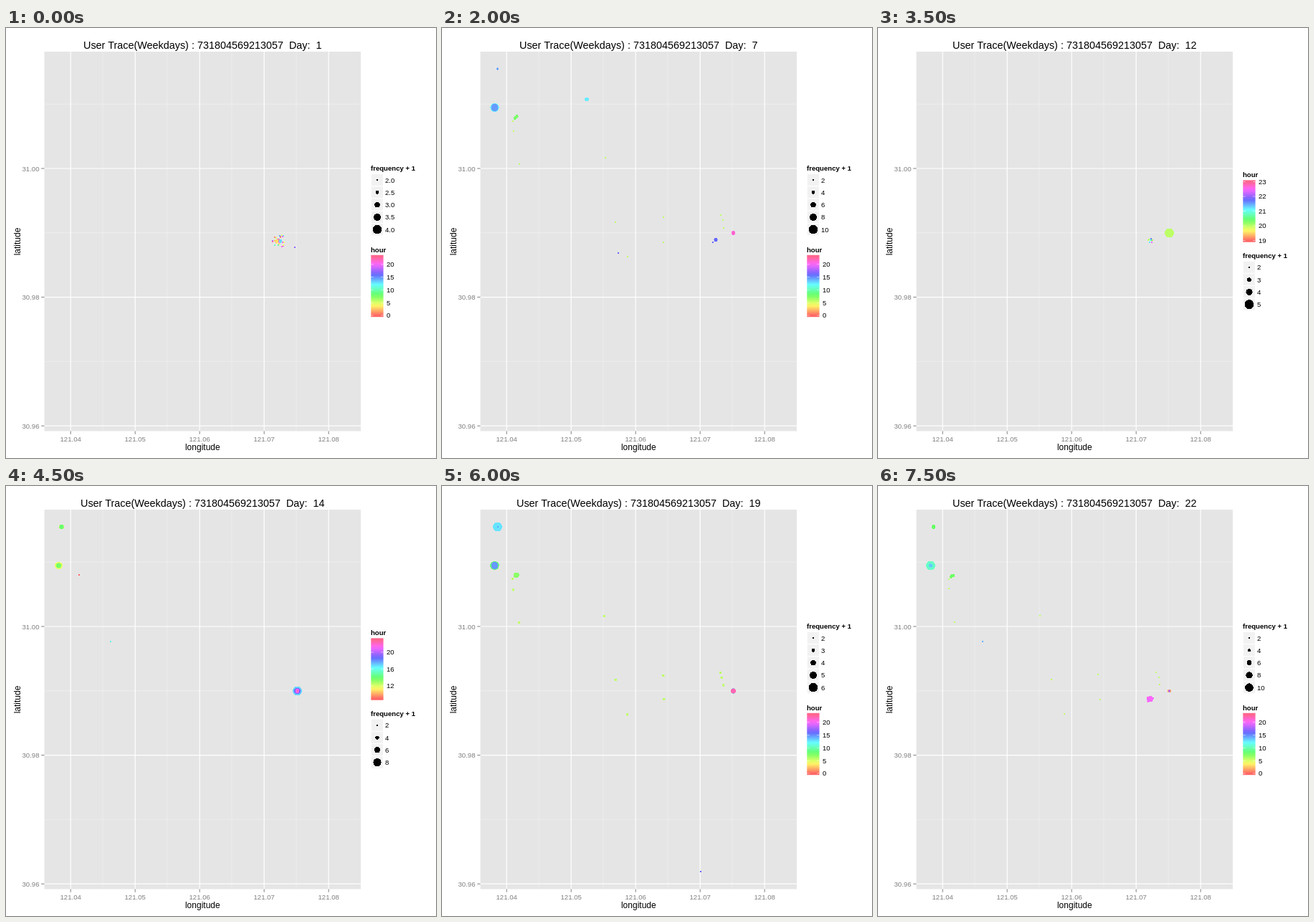
An HTML page for the animation above (8 s loop, 600 px wide and 600 px high).

```html
<!DOCTYPE html>
<html lang="en">
<head>
<meta charset="utf-8">
<title>User trace</title>
<style>
html, body { margin: 0; width: 100%; height: 100%; overflow: hidden; background: #fff; }
svg { display: block; width: 600px; height: 600px; font: 9.6px "Liberation Sans", Arial, sans-serif; }
text { white-space: pre; }
.mid { text-anchor: middle; }
.end { text-anchor: end; }
.grey { fill: #7f7f7f; }
.bold { font-weight: bold; }
.title { font-size: 14.4px; }
.axis { font-size: 12px; }
circle { shape-rendering: crispEdges; }
</style>
</head>
<body>
<svg viewBox="0 0 600 600">
  <defs><linearGradient id="hours" x1="0" y1="1" x2="0" y2="0"></linearGradient></defs>
  <g id="axes"></g>
  <g id="plot"></g>
</svg>
<script>
const USER = '731804569213057', STEP = 500, KEY = 17.28, BAR = 5 * KEY, BINS = 20;

// Places, and the key points of the way to work and of the way back.
const WORK = [73.5, 111], PARK = [77.5, 57], MALL = [103.5, 124.5], HOME = [406.5, 286], YARD = [381, 297];
const THERE = [[99, 130], [100, 144], [107, 190], [227, 181], [242, 270], [259, 318], [308, 264],
  [309, 298], [388, 261], [391, 268], [393, 278]];
const BACK = [[95, 188], [207, 185], [234, 241], [246, 314], [257, 322], [307, 302], [364, 262],
  [386, 267], [389, 276], [388, 288]];

const $ = id => document.getElementById(id);
const span = (a, b, step = 1) => Array.from({ length: Math.floor((b - a) / step) + 1 }, (_, i) => a + i * step);
const hue = t => `hsl(${345 * t},100%,70%)`;

const text = (x, y, str, cls = '') => `<text x="${x}" y="${y}" class="${cls}">${str}</text>`;
const rect = (x, y, w, h, fill, extra = '') =>
  `<rect x="${x}" y="${y}" width="${w}" height="${h}" fill="${fill}" ${extra}/>`;
const line = (x1, y1, x2, y2, color, w) =>
  `<path d="M${x1} ${y1}L${x2} ${y2}" stroke="${color}" stroke-width="${w}"/>`;
// The smallest dots fall on whole pixels.
const dot = (x, y, r, fill) => r < 1.3
  ? rect(Math.round(x) - 1, Math.round(y) - 1, 2, 2, fill)
  : `<circle cx="${x}" cy="${y}" r="${r}" fill="${fill}"/>`;

function random(seed) {
  seed *= 7919;
  return () => (seed = (seed * 16807) % 2147483647) / 2147483647;
}

// Builders of points: each returns a list of { x, y, hour, r }.
const spot = ([x, y], hour, r = 1.1) => [{ x, y, hour, r }];

const stay = (at, r, from, to, inner = .8) => [...spot(at, from, r), ...spot(at, to, r * inner)];

function cloud(seed, [x, y], n, size, from, to, r = 1.1) {
  const rnd = random(seed);
  return span(1, n).flatMap(() => {
    const a = rnd() * 2 * Math.PI, d = size * rnd();
    return spot([x + d * Math.cos(a), y + .8 * d * Math.sin(a)], from + rnd() * (to - from), r);
  });
}

function trail(seed, path, hour, r = 1.1) {
  const rnd = random(seed), shift = () => 2 * rnd() - 1;
  return path.flatMap(([x, y]) => spot([x + shift(), y + shift()], hour, r));
}

const commute = (seed, r) => [
  ...cloud(seed, MALL, 5, 3.5, 7, 8, 1.9), ...trail(seed, THERE, 5.7, r)
];

const routine = n => [
  stay(PARK, 2.6, 13, 14), stay(WORK, 6.4, 11, 14.5), commute(n),
  cloud(n, YARD, 6, 4, 15, 18), stay(HOME, 3, 21, 22)
];

// The legend lists sizes from 2 up to max, and the multiples of `every` as hours.
function day(n, step, max, points, { lo = 0, every = 5 } = {}) {
  const sizes = span(2, max, step);
  return { n, max, lo, sizes, points: points.flat(), decimals: step < 1 ? 1 : 0,
    marks: span(Math.ceil(lo / every) * every, 23, every), hourFirst: sizes.length < 5 };
}

const days = [
  day(1, .5, 4, [cloud(3, YARD, 26, 11, 0, 23), cloud(8, YARD, 18, 5, 0, 23),
    stay([378, 297], 2.2, 4, 3), stay([383, 297], 2.2, 12, 13), spot([403, 306], 17)]),
  day(2, 1, 5, [cloud(5, YARD, 30, 7, 0, 23), stay(HOME, 2.4, 22, 22)]),
  day(5, 1, 7, [stay(PARK, 2.2, 14.5, 14.5), stay(WORK, 6.4, 13.5, 14.6), commute(5),
    trail(5, BACK, 16), spot([101, 130], 16), stay(HOME, 2.2, 23, 23),
    cloud(6, YARD, 9, 6, 16, 23), stay([377, 299], 2.3, 16, 16), stay([379, 297], 2.2, 1.5, 1.5)]),
  day(6, 2, 9, routine(6)),
  day(7, 2, 10, [stay(PARK, 1.7, 14.5, 14.5), stay(WORK, 6.2, 12.5, 14.6),
    stay([202, 99.5], 2.8, 12.5, 12.5), commute(7), spot(BACK[3], 16),
    stay([382, 295.5], 2.6, 16, 16), spot([378, 299], 16), stay(HOME, 3, 21, 22, .4)]),
  day(8, 1, 6, routine(8)),
  day(9, 1, 6, routine(9)),
  day(12, 1, 5, [stay(HOME, 6.4, 20, 20), cloud(12, [381, 296.5], 9, 4, 19, 23)], { lo: 19, every: 1 }),
  day(13, 1, 4, [cloud(13, YARD, 10, 5, 0, 23), stay(HOME, 4.5, 21, 22)]),
  day(14, 2, 9, [stay(PARK, 3.4, 12.7, 14), stay(WORK, 5.4, 11.8, 13.6, .65), spot([102, 124], 9),
    spot([146, 217], 16), stay(HOME, 6.4, 17, 19, .7), stay(HOME, 2.8, 21, 23, .4)],
    { lo: 9, every: 4 }),
  day(15, 1, 7, routine(15)),
  day(16, 1, 7, [...routine(16), spot(BACK[4], 16)]),
  day(19, 1, 6, [stay(PARK, 6.4, 12.7, 14.5, .15), stay(WORK, 6.3, 8.5, 14.7), commute(19, 1.8),
    stay(MALL, 3.7, 7, 7), stay(HOME, 3.7, 13, 22, .95), spot([361, 538], 16)]),
  day(20, 2, 10, routine(20)),
  day(21, 1, 7, routine(21)),
  day(22, 2, 11, [stay(PARK, 2.7, 8, 8), stay(WORK, 6.4, 10.5, 13.5, .4), commute(22),
    spot([146, 217], 14), stay([380, 296], 3, 20, 20), cloud(22, [379.5, 296.5], 20, 6, 19.5, 20.5, 1.4),
    stay(HOME, 2.5, 2, 18, .7)])
];

function drawAxes() {
  const lines = (xs, ys, w, color) =>
    xs.map(x => line(x, 33, x, 562.5, color, w)).join('') +
    ys.map(y => line(53.5, y, 495, y, color, w)).join('');
  const xs = span(90.2, 451, 90), ys = span(196, 556, 179.6);
  return rect(53.5, 33, 441.5, 529.5, '#e5e5e5') +
    lines(span(135, 405, 90), span(106.2, 466, 179.6), .6, '#f2f2f2') +
    lines(xs, ys, 1.2, '#fff') +
    xs.map((x, i) => line(x, 562.5, x, 566.8, '#7f7f7f', 1) +
      text(x, 577.3, (121.04 + i / 100).toFixed(2), 'mid grey')).join('') +
    ys.map((y, i) => line(49.2, y, 53.5, y, '#7f7f7f', 1) +
      text(46.5, y + 3.6, (31 - i / 50).toFixed(2), 'end grey')).join('') +
    text(274.3, 589, 'longitude', 'mid axis') +
    `<g transform="translate(20 298) rotate(-90)">${text(0, 0, 'latitude', 'mid axis')}</g>`;
}

function sizeLegend(d, y) {
  return text(509, y + 3.3, 'frequency + 1', 'bold') + d.sizes.map((v, i) => {
    const top = y + 7.3 + i * KEY, mid = top + KEY / 2;
    return rect(509.3, top, KEY, KEY, '#f2f2f2', 'stroke="#fff"') +
      dot(518, mid, 1.07 * (1 + 5 * (v - 2) / (d.max - 2)), '#000') +
      text(529, mid + 3.5, v.toFixed(d.decimals));
  }).join('');
}

function hourLegend(d, y) {
  const top = y + 7.6, bin = BAR / BINS;
  return text(509, y + 3.3, 'hour', 'bold') + rect(509.3, top, KEY, BAR, 'url(#hours)') +
    d.marks.map(h => {
      const v = top + BAR - bin / 2 - (BAR - bin) * (h - d.lo) / (23 - d.lo);
      return line(509.3, v, 512.8, v, '#fff', .5) + line(523.1, v, 526.6, v, '#fff', .5) +
        text(531, v + 3.4, h);
    }).join('');
}

function drawDay(d) {
  const rows = d.sizes.length, y = 196.1 - (rows - 5) * KEY / 2;
  const next = y + 26.7 + KEY * (d.hourFirst ? 5 : rows);
  return text(274.3, 29, `User Trace(Weekdays) : ${USER}  Day:  ${d.n}`, 'mid title') +
    d.points.map(p => dot(p.x, p.y, p.r, hue((p.hour - d.lo) / (23 - d.lo)))).join('') +
    sizeLegend(d, d.hourFirst ? next : y) + hourLegend(d, d.hourFirst ? y : next);
}

$('hours').innerHTML = span(0, BINS - 1).map(i =>
  `<stop offset="${(i + .5) / BINS}" stop-color="${hue(i / (BINS - 1))}"/>`).join('');
$('axes').innerHTML = drawAxes();

let shown = -1;
function tick() {
  const i = Math.floor(performance.now() / STEP) % days.length;
  if (i !== shown) $('plot').innerHTML = drawDay(days[shown = i]);
  requestAnimationFrame(tick);
}
tick();
</script>
</body>
</html>
```
